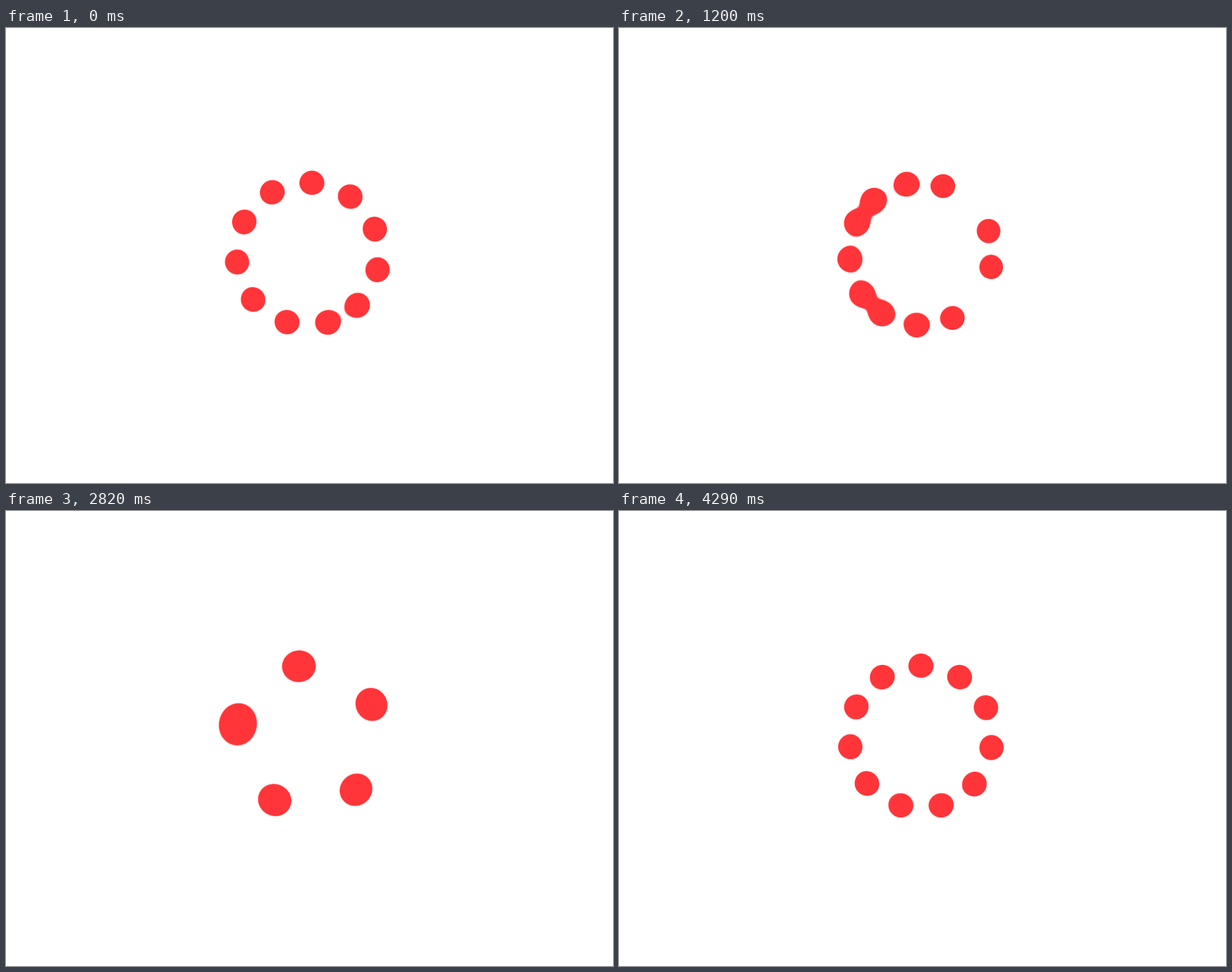
An HTML page with a canvas that plays this animation: 800x600 px, repeating every 4.32 s.

```html
<!DOCTYPE html>
<html lang="en">
<head>
<meta charset="utf-8">
<title>Metaball ring</title>
<style>
  html, body { margin: 0; width: 100%; height: 100%; overflow: hidden; background: #fff; }
  canvas { display: block; }
</style>
</head>
<body>
<canvas id="stage" width="800" height="600"></canvas>
<script>
const LOOP = 4320, STEP = 30;
const DOTS = 11, GAP = 360 / DOTS;
const CENTER = { x: 398, y: 298 }, RING = 94.4, ANCHOR = 40.7;
const STRENGTH = 200;            // squared radius of a lone ball
const COLOR = [255, 53, 57];
const AREA = { x: 258, y: 158, size: 280 };

// Extra angle between neighbouring dots over time: [ms, degrees].
const SPREAD = [
  [0, 0.48], [690, 21], [1200, 49.8], [1800, 77.8], [2190, 90],
  [2820, 112.2], [3240, 128.2], [3780, 152], [4290, 163.7], [4320, 164.12]
];
const SEAM_SPEED = 0.014;

const ctx = document.getElementById('stage').getContext('2d');
const image = ctx.createImageData(AREA.size, AREA.size);

// Slope at a key, from the parabola through it and its neighbours.
function slope(i) {
  if (i === 0 || i >= SPREAD.length - 2) return SEAM_SPEED;
  const [[t0, p0], [t1, p1], [t2, p2]] = SPREAD.slice(i - 1, i + 2);
  const before = (p1 - p0) / (t1 - t0), after = (p2 - p1) / (t2 - t1);
  return (before * (t2 - t1) + after * (t1 - t0)) / (t2 - t0);
}

function spreadAt(t) {
  let i = 0;
  while (t >= SPREAD[i + 1][0]) i++;
  const [t0, p0] = SPREAD[i], [t1, p1] = SPREAD[i + 1];
  const h = t1 - t0, u = (t - t0) / h, v = 1 - u;
  return p0 * (1 + 2 * u) * v * v + h * slope(i) * u * v * v
       + p1 * u * u * (3 - 2 * u) - h * slope(i + 1) * u * u * v;
}

function ballsAt(t) {
  const spacing = GAP + spreadAt(t);
  return Array.from({ length: DOTS }, (_, i) => {
    const angle = (ANCHOR + spacing * (i + 1)) * Math.PI / 180;
    return {
      x: CENTER.x + RING * Math.cos(angle) - AREA.x,
      y: CENTER.y + RING * Math.sin(angle) - AREA.y
    };
  });
}

function draw(t) {
  const balls = ballsAt(t), data = image.data;
  let k = 0;
  for (let y = 0; y < AREA.size; y++) {
    for (let x = 0; x < AREA.size; x++) {
      let field = 0;
      for (const ball of balls) {
        const dx = x + 0.5 - ball.x, dy = y + 0.5 - ball.y;
        field += STRENGTH / (dx * dx + dy * dy + 1e-6);
      }
      const cover = Math.min(1, Math.max(0, 0.5 + (field - 1) * 9));
      for (const channel of COLOR) data[k++] = 255 + (channel - 255) * cover;
      data[k++] = 255;
    }
  }
  ctx.putImageData(image, AREA.x, AREA.y);
}

const start = performance.now();
let shown = -1;
function tick() {
  const elapsed = (performance.now() - start) % LOOP;
  const t = Math.floor(elapsed / STEP) * STEP;
  if (t !== shown) draw(shown = t);
  requestAnimationFrame(tick);
}
tick();
</script>
</body>
</html>
```
